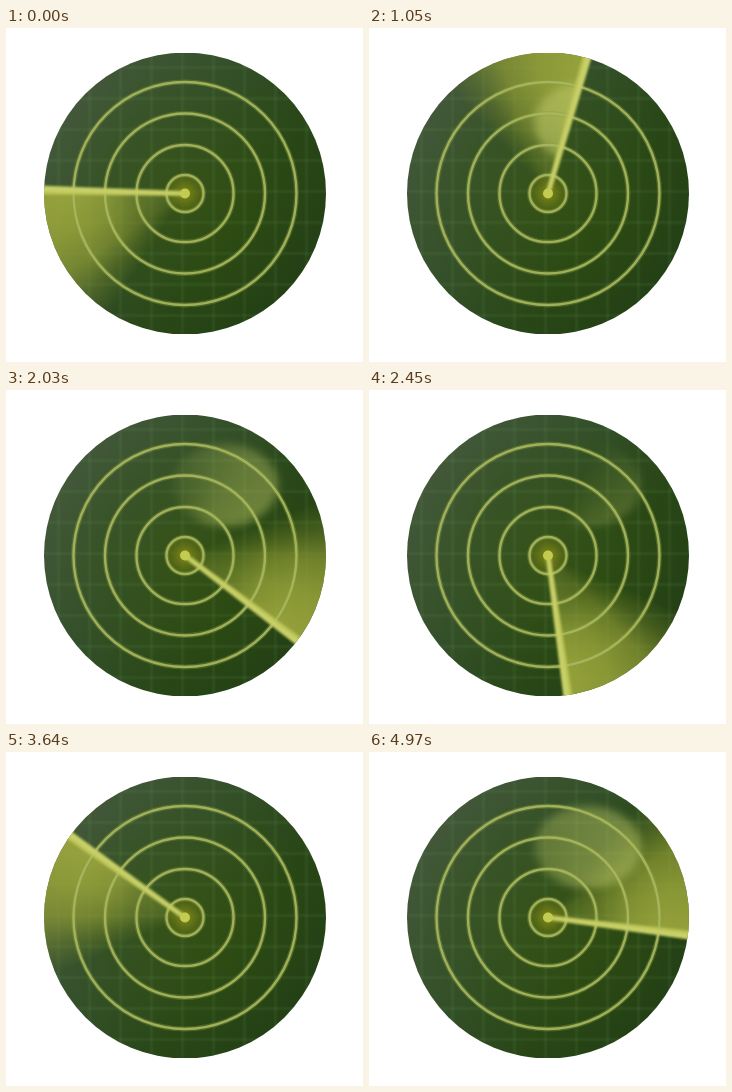
An HTML page for the animation above (5.04 s loop, 357 px wide and 334 px high).

```html
<!DOCTYPE html>
<html lang="en">
<head>
<meta charset="utf-8">
<title>Radar</title>
<style>
  html, body { margin: 0; width: 100%; height: 100%; overflow: hidden; background: #fff; }
  #scope {
    --a: 272deg;
    position: absolute; left: 38px; top: 25px; width: 282px; height: 281px;
    clip-path: circle(141px);
    background:
      radial-gradient(circle closest-side, #3c5a0a70 0, #36540c38 60%, #0000 95%),
      linear-gradient(125deg, #43583a 12%, #34502a 40%, #284616 65%, #233f15 90%);
  }
  #scope > * { position: absolute; inset: 0; }
  .grid {
    --line: transparent 0 13px, #6a9a5a1c 15px 16px, transparent 18px 31px;
    background:
      repeating-linear-gradient(90deg, var(--line)) -1px 0,
      repeating-linear-gradient(var(--line)) 0 -1px;
  }
  .trail {
    background: conic-gradient(from calc(var(--a) - 60deg),
      #8c983000 0deg, #8c983050 12deg, #929e36b0 24deg, #98a43adc 40deg, #a0aa3ee8 60deg, #0000 60deg);
    mask-image: radial-gradient(circle, #0004 15px, #0007 45px, #000d 80px, #000 110px);
  }
  .echo {
    mask-image: conic-gradient(from calc(var(--a) - 150deg),
      #0000 0deg, #0004 25deg, #0009 55deg, #000c 90deg, #000 150deg, #0000 150deg);
  }
  .echo::before {
    content: ""; position: absolute; left: 127px; top: 29px; width: 107px; height: 82px;
    border-radius: 50%; background: #bcc66699; filter: blur(4px);
  }
  .beam { transform: rotate(var(--a)); }
</style>
</head>
<body>
<div id="scope">
  <div class="grid"></div>
  <div class="trail"></div>
  <div class="echo"></div>
  <svg viewBox="-141 -140.5 282 281" width="282" height="281">
    <defs>
      <radialGradient id="halo">
        <stop offset=".2" stop-color="#757f18"/>
        <stop offset="1" stop-color="#5a6c14" stop-opacity=".4"/>
      </radialGradient>
      <filter id="soft" x="-1" y="-.1" width="3" height="1.2"><feGaussianBlur stdDeviation="1"/></filter>
    </defs>
    <circle r="19" fill="url(#halo)"/>
    <g id="rings" fill="none">
      <g stroke="#8a9a40" stroke-opacity=".35" stroke-width="5">
        <circle r="18.5"/><circle r="48.5"/><circle r="80"/><circle r="111.5"/>
      </g>
      <g stroke="#a9b860" stroke-opacity=".9" stroke-width="2.4">
        <circle r="18.5"/><circle r="48.5"/><circle r="80"/><circle r="111.5"/>
      </g>
    </g>
    <g class="beam" filter="url(#soft)">
      <path d="M-2.5 0L-6 -145H3L2.5 0Z" fill="#b9c252"/>
      <path d="M-1.5 0L-3 -145H2L1.5 0Z" fill="#c8d06a"/>
    </g>
    <circle r="5" fill="#c2cc50"/>
  </svg>
</div>
<script>
  const LOOP = 5040, STEP = 70;
  // [time in ms, heading in degrees clockwise from up]
  const headings = [
    [0, 272], [420, 306], [1050, 376.6], [1610, 442.7],
    [2450, 532.6], [3640, 666], [4270, 736.6], [4970, 817.7]
  ];
  const scope = document.getElementById("scope");

  function headingAt(time) {
    const next = Math.max(1, headings.findIndex(([t]) => t >= time));
    const [t0, a0] = headings[next - 1], [t1, a1] = headings[next];
    return a0 + (a1 - a0) * (time - t0) / (t1 - t0);
  }

  function draw() {
    const time = Math.floor(performance.now() % LOOP / STEP) * STEP;
    scope.style.setProperty("--a", headingAt(time) % 360 + "deg");
    requestAnimationFrame(draw);
  }
  draw();
</script>
</body>
</html>
```
